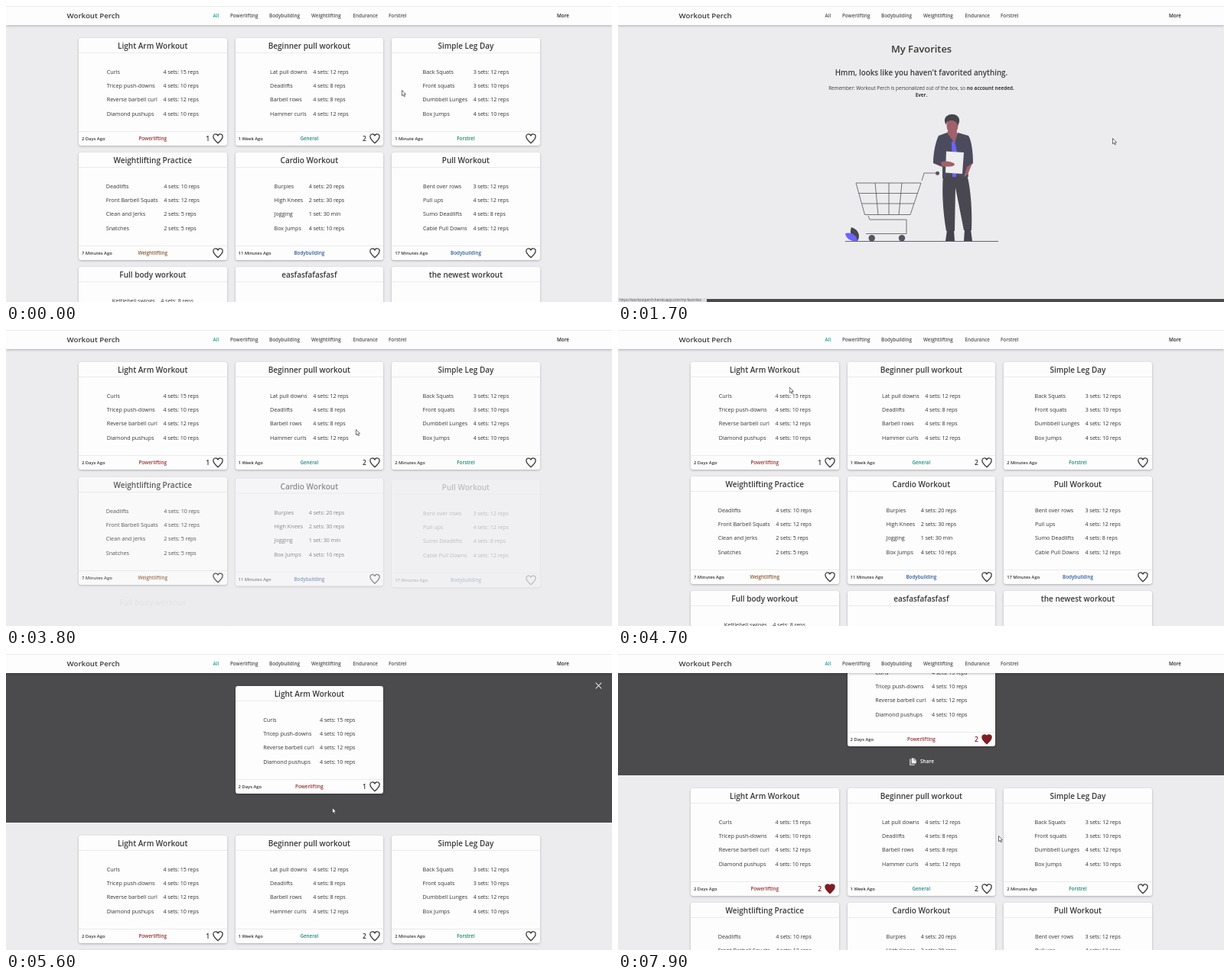
An HTML page that plays this animation: 792 by 388 pixels, repeating every 8000 ms.

```html
<!DOCTYPE html>
<html lang="en">
<head>
<meta charset="utf-8">
<title>Workout Perch</title>
<style>
html, body { margin: 0; width: 100%; height: 100%; overflow: hidden; background: #ecebed; }
body { position: relative; font: 400 7.2px/10px "Open Sans", "Noto Sans", sans-serif; color: #333; }
body *, .abs { box-sizing: border-box; }
.abs, nav, nav span, .card, .card > *, .foot > *, #stage { position: absolute; white-space: nowrap; }
#stage { left: 0; top: 0; width: 792px; height: 388px; overflow: hidden; }
nav { left: 0; top: 0; width: 792px; height: 25px; background: #fefdfe; border-top: 1px solid #e9e8ea; box-shadow: 0 1px 3px #0004; }
nav span { top: 6.5px; font-size: 6.3px; font-weight: 600; color: #505050; }
nav .brand { left: 79.5px; font-size: 9.7px; color: #3a3a3a; }
nav .more { left: 720px; color: #222; }
.card { width: 193.5px; height: 141.5px; background: #fefdfe; border-radius: 3px; box-shadow: 0 1px 3px #0004; }
.card h2 { margin: 0; width: 100%; height: 20px; font-size: 10px; line-height: 20px; font-weight: 600; text-align: center; color: #383838; border-bottom: 1px solid #ebeaec; }
.rows { top: 20px; left: 0; width: 100%; height: 103.5px; display: grid; grid-template-columns: auto auto; grid-auto-rows: 18.35px; column-gap: 7.6px; place-content: center; align-items: center; }
.rows i { font-style: normal; letter-spacing: -.1px; }
.foot { left: 0; bottom: 0; width: 100%; height: 19.5px; line-height: 18px; border-top: 1px solid #ebeaec; font-weight: 600; }
.time { left: 4px; font-size: 5.8px; }
.cat { width: 100%; text-align: center; font-size: 6.3px; }
.count { right: 22.3px; font-size: 8.5px; }
.foot svg { right: 3.5px; top: 1px; width: 16px; height: 16px; fill: none; stroke: #333; stroke-width: 1.9; }
.liked .count { color: #7f1d22; }
.liked svg { fill: #7f1d22; stroke: #7f1d22; }
#panel { left: 0; top: 25px; width: 792px; height: 196px; background: #4b4a4c; }
#share { left: 381px; top: 173px; color: #fff; font-size: 6.5px; font-weight: 600; }
#favorites { left: 0; top: 0; width: 792px; height: 388px; text-align: center; }
#favorites p { left: 0; width: 793px; margin: 0; font-weight: 600; color: #3a3a3a; }
#menu { left: 702px; top: 26px; width: 51px; height: 21px; line-height: 20px; font-size: 6.3px; font-weight: 600; text-align: center; background: #fefdfe; box-shadow: 0 1px 3px #0004; }
#status { left: 0; bottom: 0; height: 5.5px; padding-left: 2px; font-size: 4.5px; line-height: 5px; color: #555; background: #dddde0; }
#cursor { left: 0; top: 0; }
</style>
</head>
<body>
<div id="stage">
  <div id="home" class="abs">
    <div id="grid" class="abs"></div>
    <div id="panel" class="abs">
      <div id="detail" class="abs" style="left:0;top:-25px">
        <svg class="abs" style="left:770px;top:37px" width="9" height="9" stroke="#ddd" stroke-width="1.1"><path d="M.7.7 8.3 8.3M8.3.7.7 8.3"/></svg>
      </div>
      <div id="share" class="abs">
        <svg class="abs" style="left:0;top:0" width="10" height="10" fill="none" stroke="#eee"><path d="M.8 1.5V9.2H6.8" stroke-width="1.1"/><path d="M2.6.4H6L8.7 3V7.6H2.6Z" fill="#eee" stroke="none"/><path d="M5.8 1V3.2H8" stroke="#4b4a4c" stroke-width=".6"/></svg>
        <span class="abs" style="left:14px">Share</span>
      </div>
    </div>
  </div>

  <div id="favorites" class="abs">
    <p class="abs" style="top:46px;font-size:12.9px;line-height:20px">My Favorites</p>
    <p class="abs" style="top:83px;font-size:9.8px">Hmm, looks like you haven't favorited anything.</p>
    <p class="abs" style="top:102.5px;font-size:6.35px;line-height:9px;font-weight:400">Remember: Workout Perch is personalized out of the box, so <b>no account needed.<br>Ever.</b></p>
    <svg class="abs" style="left:0;top:0" width="792" height="388" fill="none" stroke-linejoin="round">
      <path d="M297 308.5H497" stroke="#55545c" stroke-width=".9"/>
      <g stroke="#55545c" stroke-width=".8">
        <path d="M311 232H396L382 273.5H322.500ZM315 245.500H391.500M319 259H387M336 232 340 273.500M354 232V273.500M371 232 367 273.500"/>
        <path d="M397 229 400 219H415M327 275 329 280H377V298.500H324"/>
      </g>
      <g fill="#55545f"><circle cx="417.5" cy="219.300" r="2.500"/><circle cx="331.700" cy="304.200" r="4.200"/><circle cx="371" cy="304.200" r="4.200"/></g>
      <path d="M305 290C315 293 317 302 313 308 305 305 302 297 305 290Z" fill="#47464f"/>
      <path d="M297 298C305 296 312 300 313 308 304 309 298 305 297 298Z" fill="#6c63ff"/>
      <path d="M425 221H456C461 238 463 268 462 294H452L441 238 440 295H429C425 272 423 246 425 221Z" fill="#494850"/>
      <path d="M430 294H439L440 308H428ZM453 293H461L463 308H452Z" fill="#44434c"/>
      <path d="M432 161H442L445 174 438 183 429 170Z" fill="#a0616a"/>
      <ellipse cx="437" cy="157" rx="7.500" ry="10" fill="#a0616a"/>
      <path d="M429 156C424 148 429 142 437 142 445 142 449 149 444 157 443 152 440 150 436 150 432 150 429 152 429 156Z" fill="#46454c"/>
      <path d="M430 166 419 170C415 178 412 193 412 206L424 211 424 226 434 222 458 224 457 213 464 206C464 192 462 176 458 170L444 166 440 180Z" fill="#4b4b5d"/>
      <path d="M436 178 440 177 443 191 442 224H437Z" fill="#6c63ff"/>
      <path d="M429 190.500 452 192 450 220 428 218.500Z" fill="#eeedf0"/>
      <path d="M422 205C428 202 436 204 440 207 440 211 432 211 423 210ZM456 211 463 206 457 221 452 224Z" fill="#a0616a"/>
    </svg>
    <div class="abs" style="left:0;top:384px;width:792px;height:4px;background:#4b4a4c"></div>
  </div>

  <nav><span class="brand">Workout Perch</span><span class="more">More</span></nav>
  <div id="menu" class="abs">My Favorites</div>
  <div id="status" class="abs"></div>
  <svg id="cursor" class="abs" width="8" height="11"><path d="M.5.5V7.700L2.200 6.300 3.300 8.800 4.500 8.300 3.400 5.800H5.500Z" fill="#fff" stroke="#333" stroke-width=".7"/></svg>
</div>
<script>
const $ = id => document.getElementById(id);
const colors = { Powerlifting: '#953232', General: '#1f8a86', Forstrel: '#168a68', Weightlifting: '#87592c', Bodybuilding: '#2b5c96' };

// title | age | category | likes | exercise,sets,reps;...
const workouts = `Light Arm Workout|2 Days Ago|Powerlifting|1|Curls,4,15;Tricep push-downs,4,10;Reverse barbell curl,4,12;Diamond pushups,4,10
Beginner pull workout|1 Week Ago|General|2|Lat pull downs,4,12;Deadlifts,4,8;Barbell rows,4,8;Hammer curls,4,12
Simple Leg Day|1 Minute Ago|Forstrel||Back Squats,3,12;Front squats,3,10;Dumbbell Lunges,4,12;Box Jumps,4,10
Weightlifting Practice|7 Minutes Ago|Weightlifting||Deadlifts,4,10;Front Barbell Squats,4,12;Clean and Jerks,2,5;Snatches,2,5
Cardio Workout|11 Minutes Ago|Bodybuilding||Burpies,4,20;High Knees,2,30;Jogging,1,30;Box Jumps,4,10
Pull Workout|17 Minutes Ago|Bodybuilding||Bent over rows,3,12;Pull ups,4,12;Sumo Deadlifts,4,8;Cable Pull Downs,4,12
Full body workout||General||Kettlebell swings,4,8;Pull ups,4,8;Lunges,4,8;Burpies,4,8
easfasfafasfasf||General||
the newest workout||General||`.split('\n');

function makeCard(line, column, row, parent) {
  const [title, age, category, likes, list] = line.split('|');
  const rows = list.split(';').filter(Boolean).map(item => {
    const [name, sets, reps] = item.split(',');
    return `<span>${name}</span><i>${sets} ${sets == 1 ? `set: ${reps} min` : `sets: ${reps} reps`}</i>`;
  }).join('');
  const card = document.createElement('div');
  card.className = 'card';
  card.style.left = 95 + column * 204.6 + 'px';
  card.style.top = 41.5 + row * 150 + 'px';
  card.innerHTML = `<h2>${title}</h2><div class="rows">${rows}</div><div class="foot">
    <span class="time">${age}</span><span class="cat" style="color:${colors[category]}">${category}</span><span class="count">${likes}</span>
    <svg viewBox="0 0 24 24"><path d="M12 20.500C5 14.300 3 12 3 8.500A4.600 4.600 0 0 1 12 6.500A4.600 4.600 0 0 1 21 8.500C21 12 19 14.300 12 20.500Z"/></svg></div>`;
  parent.append(card);
  return card;
}
const cards = workouts.map((line, i) => makeCard(line, i % 3, Math.floor(i / 3), $('grid')));
const likedCards = [cards[0], makeCard(workouts[0], 1, 0, $('detail'))];

const links = ['All', 'Powerlifting', 'Bodybuilding', 'Weightlifting', 'Endurance', 'Forstrel'].map((text, i) => {
  const link = document.createElement('span');
  link.textContent = text;
  link.style.left = [270.5, 293, 344, 399, 453.5, 500][i] + 'px';
  document.querySelector('nav').append(link);
  return link;
});

const pointer = [[0, 517, 110], [100, 517, 110], [500, 727, 10], [600, 727, 10], [900, 728, 36], [1000, 728, 36],
  [1700, 646, 173], [2400, 273, 9], [2600, 273, 9], [3800, 457, 130], [4800, 217, 73], [5100, 217, 73],
  [5600, 426, 201], [6000, 430, 196], [6600, 492, 144], [6900, 492, 144], [7200, 481, 130], [7500, 285, 302], [7900, 497, 238]];

const ramp = (t, start, length) => Math.min(1, Math.max(0, (t - start) / length));
const smooth = p => p * p * (3 - 2 * p);
const show = (element, visible) => { element.style.display = visible ? '' : 'none'; };
const moveY = (element, y) => { element.style.transform = `translateY(${y}px)`; };

function render(t) {
  const onFavorites = t >= 1000 && t < 2500;
  const opened = t >= 4900;
  show($('favorites'), onFavorites);
  show($('home'), !onFavorites);
  show($('menu'), t >= 500 && t < 1000);
  links[0].style.color = onFavorites ? '' : '#12a594';

  cards.forEach((card, i) => {
    const p = t < 2500 ? 1 : smooth(ramp(t, 3140 + 100 * i, 500));
    card.style.opacity = p;
    moveY(card, 5.5 * (1 - p));
  });
  cards[2].querySelector('.time').textContent = t < 2500 ? '1 Minute Ago' : '2 Minutes Ago';

  moveY($('grid'), opened ? 196 : 0);
  const open = 1 - (1 - ramp(t, 4900, 350)) ** 2;
  $('panel').style.opacity = open;
  moveY($('panel'), -196 * (1 - open));
  $('detail').style.opacity = ramp(t, 5150, 300);
  $('share').style.opacity = ramp(t, 5650, 300);
  moveY($('home'), -42 * smooth(ramp(t, 6200, 300)) - 40 * ramp(t, 7800, 200));

  const liked = t >= 7300;
  likedCards.forEach(card => {
    card.classList.toggle('liked', liked);
    card.querySelector('.count').textContent = liked ? 2 : 1;
  });

  const hovering = t >= 800 && t < 1900, waiting = opened && t < 5300;
  show($('status'), hovering || waiting);
  $('status').style.width = hovering ? '116px' : '265px';
  $('status').textContent = hovering ? 'https://workoutperch.herokuapp.com/my-favorites' : 'Waiting for workoutperch.herokuapp.com...';

  const next = Math.max(1, pointer.findIndex(key => key[0] >= t));
  const [t0, x0, y0] = pointer[next - 1], [t1, x1, y1] = pointer[next];
  const p = smooth(ramp(t, t0, t1 - t0));
  $('cursor').style.transform = `translate(${x0 + (x1 - x0) * p}px, ${y0 + (y1 - y0) * p}px)`;
}

function tick() {
  render(Math.floor(performance.now() % 8000 / 100) * 100);
  requestAnimationFrame(tick);
}
tick();
</script>
</body>
</html>
```
